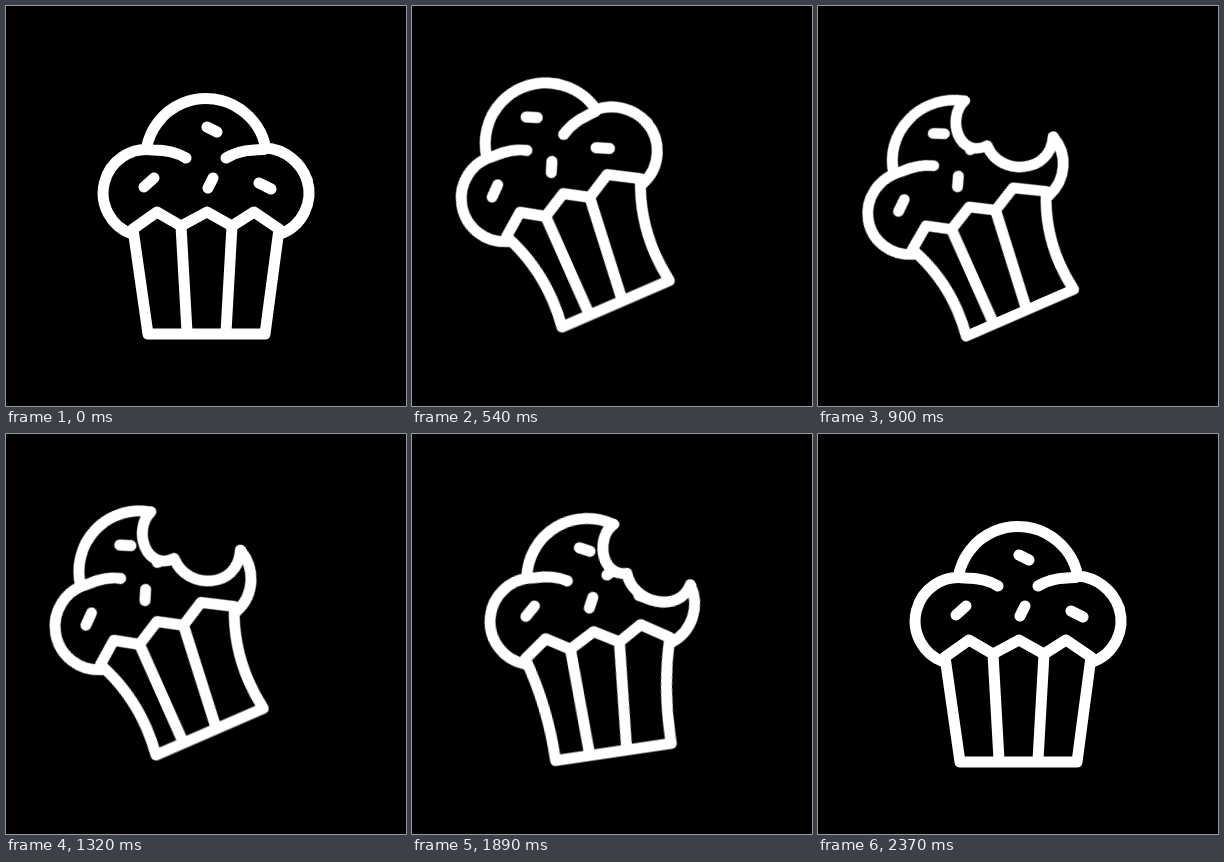
These frames come from a looping animation (400 by 400 pixels, 2430 ms). An HTML page without scripts:

```html
<!DOCTYPE html>
<html lang="en">
<head>
<meta charset="utf-8">
<title>Muffin</title>
<style>
  html, body { margin: 0; height: 100%; overflow: hidden; background: #000; }
  svg { display: block; width: 100vw; height: 100vh; }
  path { fill: none; stroke: #fff; stroke-width: 11; stroke-linecap: round; stroke-linejoin: round; }

  /* Everything pivots on the lower left corner of the cup. */
  g { transform-origin: 142px 328px; }
  g, .cup, .bite { animation: 2430ms linear infinite; }
  .bounce { animation-name: bounce; }
  .shift { animation-name: shift; }
  .tilt { animation-name: tilt; }
  .squash { animation-name: squash; }
  .sprinkles { animation-name: sprinkles; }
  .cup { animation-name: cup; }
  .bite { fill: #000; animation-name: bite; }

  @keyframes tilt {
    0% { transform: rotate(0deg); animation-timing-function: cubic-bezier(.33, 0, .1, 1); }
    24.69%, 69.55% { transform: rotate(-23.5deg); animation-timing-function: cubic-bezier(.5, 0, .5, 1); }
    86% { transform: rotate(6.3deg); animation-timing-function: cubic-bezier(.2, 0, .5, 1); }
    97.53%, 100% { transform: rotate(0deg); }
  }
  @keyframes shift {
    0% { transform: translate(0, 0); animation-timing-function: cubic-bezier(.5, 0, .1, 1); }
    24.69%, 69.55% { transform: translate(8px, -7px); animation-timing-function: cubic-bezier(.3, 0, .2, 1); }
    86%, 100% { transform: translate(0, 0); }
  }
  @keyframes bounce {
    0%, 23.46% { transform: translate(0, 0); animation-timing-function: ease-out; }
    29.63% { transform: translate(-3px, 17px); animation-timing-function: ease-in-out; }
    45.27%, 100% { transform: translate(0, 0); }
  }
  @keyframes squash {
    0%, 23.46% { transform: scaleY(1); animation-timing-function: ease-out; }
    29.63% { transform: scaleY(.93); animation-timing-function: ease-in-out; }
    45.27%, 100% { transform: scaleY(1); }
  }
  @keyframes sprinkles {
    0% { transform: translateX(0); animation-timing-function: cubic-bezier(.33, 0, .1, 1); }
    24.69%, 69.55% { transform: translateX(-8.5px); animation-timing-function: cubic-bezier(.5, 0, .5, 1); }
    86%, 100% { transform: translateX(0); }
  }
  @keyframes cup {
    0% {
      d: path("M127 223 Q134.5 275.5 142 328 L259 328 Q266 275.5 273 223 L248 206 L226 220 L201 206 L175 220 L151 206 Z M175 220 L181 326 M226 220 L220 326");
      animation-timing-function: cubic-bezier(.33, 0, .1, 1);
    }
    24.69%, 69.55% {
      d: path("M127 223 Q150 272 142 328 L259 328 Q250 272 273 223 L244 206 L219 220 L196 206 L171 220 L149 206 Z M171 220 L172 326 M219 220 L208 326");
      animation-timing-function: cubic-bezier(.5, 0, .5, 1);
    }
    86%, 100% {
      d: path("M127 223 Q134.5 275.5 142 328 L259 328 Q266 275.5 273 223 L248 206 L226 220 L201 206 L175 220 L151 206 Z M175 220 L181 326 M226 220 L220 326");
    }
  }
  @keyframes bite {
    0%, 24.69% {
      d: path("M234 103 C247 112 257 126 259.5 142 C278 143 295 156 301 174");
      animation-timing-function: ease-in-out;
    }
    30.86%, 74.07% {
      d: path("M234 103 C210 112 206 156 237 155 C236 190 284 208 301 174");
      animation-timing-function: ease-in-out;
    }
    88.89%, 100% {
      d: path("M234 103 C247 112 257 126 259.5 142 C278 143 295 156 301 174");
    }
  }
</style>
</head>
<body>
<svg viewBox="0 0 400 400">
  <g class="bounce"><g class="shift"><g class="tilt"><g class="squash">
    <path d="M140.5 142 A60.5 60.5 0 0 1 234 103"/>
    <path d="M180 152 C169 145 158 144 147 144 A43.5 43.5 0 0 0 126 228"/>
    <path d="M220 152 C231 145 242 144 258 143.5"/>
    <path d="M301 174 A43.5 43.5 0 0 1 274 228"/>
    <g class="sprinkles">
      <path d="M201 121 L211 126 M148 172 L138 181 M207 172 L202 182 M253 177 L265 183"/>
    </g>
    <path class="bite" d="M234 103 C247 112 257 126 259.5 142 C278 143 295 156 301 174"/>
    <path class="cup" d="M127 223 Q134.5 275.5 142 328 L259 328 Q266 275.5 273 223 L248 206 L226 220 L201 206 L175 220 L151 206 Z M175 220 L181 326 M226 220 L220 326"/>
  </g></g></g></g>
</svg>
</body>
</html>
```
